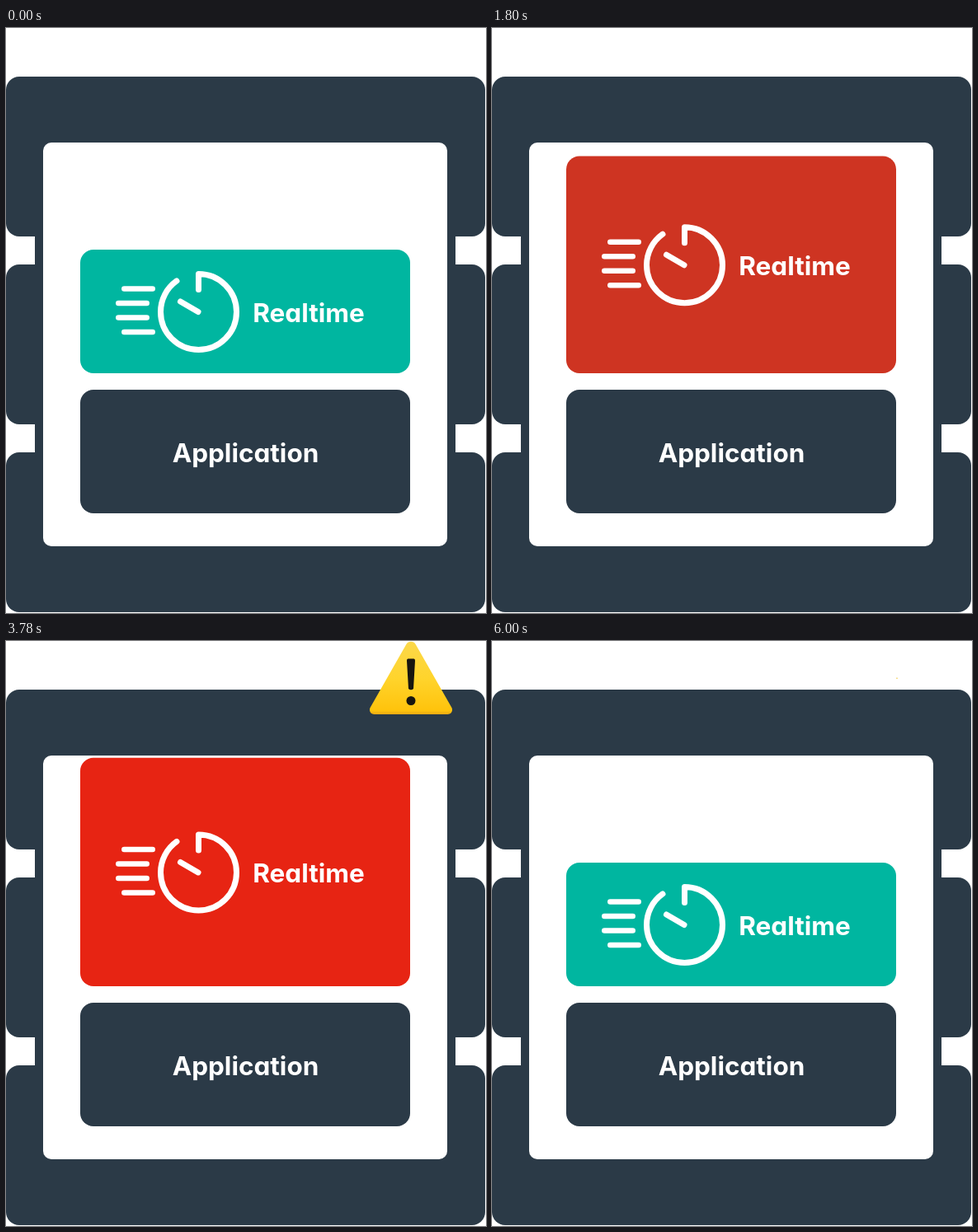
These frames come from a looping animation (582 by 710 pixels, 6.12 s). An HTML page with a canvas:

```html
<!DOCTYPE html>
<html lang="en">
<head>
<meta charset="utf-8">
<title>Realtime panel</title>
<style>
  html, body { margin: 0; width: 100%; height: 100%; overflow: hidden; background: #fff; }
  canvas, svg { position: absolute; left: 0; top: 0; display: block; }
  text {
    font: 700 31.5px Inter, Lato, "Open Sans", sans-serif;
    font-feature-settings: "cv11";
    fill: #fff;
    text-anchor: middle;
  }
</style>
</head>
<body>
<canvas id="stage" width="582" height="710"></canvas>
<svg width="582" height="710">
  <text id="label" x="367" y="357">Realtime</text>
  <text x="290.5" y="527">Application</text>
</svg>
<script>
const ctx = document.getElementById('stage').getContext('2d');
const label = document.getElementById('label');

const LOOP = 6120, STEP = 30, LAST = 6000;
const DARK = '#2b3a47';
const TEAL = [0, 182, 160], RED = [236, 33, 16];
const TRAVEL = 130;

const progress = (t, start, length) => Math.min(1, Math.max(0, (t - start) / length));
const easeInOut = u => u < 0.5 ? 2 * u * u : 1 - 2 * (1 - u) ** 2;
const backIn = (u, c = 2.2) => u * u * ((c + 1) * u - c);

function box(x, y, w, h, r, fill) {
  ctx.fillStyle = fill;
  ctx.beginPath();
  ctx.roundRect(x, y, w, h, r);
  ctx.fill();
}

function line(x1, y1, x2, y2) {
  ctx.beginPath();
  ctx.moveTo(x1, y1);
  ctx.lineTo(x2, y2);
  ctx.stroke();
}

function drawServer() {
  for (const y of [59, 287, 515]) box(0, y, 581, 194, 16, DARK);
  ctx.fillRect(35, 240, 510, 290);
  box(45, 139, 490, 490, 10, '#fff');
  box(90, 439, 400, 150, 16, DARK);
}

function drawStopwatch(dy) {
  ctx.save();
  ctx.translate(0, dy);
  ctx.strokeStyle = '#fff';
  ctx.lineCap = ctx.lineJoin = 'round';
  ctx.lineWidth = 6.5;
  [7, 0, 0, 7].forEach((inset, i) => {
    const y = 316.5 + i * 17.5;
    line(136.3 + inset, y, 170.7 + inset, y);
  });
  ctx.lineWidth = 7;
  line(211.5, 332, 233, 344.5);
  ctx.beginPath();
  ctx.moveTo(233.5, 317.5);
  ctx.lineTo(233.5, 298.5);
  ctx.arc(233.5, 344.5, 46, -Math.PI / 2, Math.atan2(-37.5, -26.5));
  ctx.stroke();
  ctx.restore();
}

function drawPanel(load) {
  const rise = load * TRAVEL;
  const rgb = TEAL.map((c, i) => Math.round(c + (RED[i] - c) * load));
  box(90, 269 - rise, 400, 150 + rise, 16, `rgb(${rgb})`);
  drawStopwatch(-rise / 2);
  label.setAttribute('transform', `translate(0 ${-rise / 2})`);
}

function drawWarning(alpha, scale) {
  if (alpha <= 0 || scale <= 0) return;
  ctx.save();
  ctx.globalAlpha = alpha;
  ctx.translate(491, 45);
  ctx.scale(scale, scale);
  ctx.translate(-491, -45);

  const gold = ctx.createLinearGradient(0, 1, 0, 89);
  gold.addColorStop(0, '#fbd84a');
  gold.addColorStop(0.5, '#ffd42c');
  gold.addColorStop(0.95, '#ffc30c');
  gold.addColorStop(1, '#e9a916');
  ctx.fillStyle = gold;
  ctx.beginPath();
  ctx.moveTo(491, 89);
  ctx.arcTo(545, 89, 491, -6, 5.5);
  ctx.arcTo(491, -6, 437, 89, 6.5);
  ctx.arcTo(437, 89, 491, 89, 5.5);
  ctx.closePath();
  ctx.fill();

  ctx.fillStyle = '#17150f';
  ctx.beginPath();
  ctx.moveTo(487.5, 21.5);
  ctx.lineTo(494.5, 21.5);
  ctx.quadraticCurveTo(496.2, 21.5, 496, 24);
  ctx.lineTo(494, 58);
  ctx.quadraticCurveTo(491, 60.5, 488, 58);
  ctx.lineTo(486, 24);
  ctx.quadraticCurveTo(485.8, 21.5, 487.5, 21.5);
  ctx.fill();
  ctx.beginPath();
  ctx.arc(491, 72.5, 5.5, 0, Math.PI * 2);
  ctx.fill();
  ctx.restore();
}

function render(t) {
  const load = easeInOut(progress(t, 424, 1840)) - easeInOut(progress(t, 3590, 1810));
  const alpha = easeInOut(progress(t, 2270, 270));
  const scale = 1 - backIn(progress(t, 5430, 572));
  ctx.clearRect(0, 0, 582, 710);
  drawServer();
  drawPanel(load);
  drawWarning(alpha, scale);
}

const begin = performance.now();
function tick() {
  const t = (performance.now() - begin) % LOOP;
  render(Math.min(LAST, Math.floor(t / STEP) * STEP));
  requestAnimationFrame(tick);
}
render(0);
requestAnimationFrame(tick);
</script>
</body>
</html>
```
